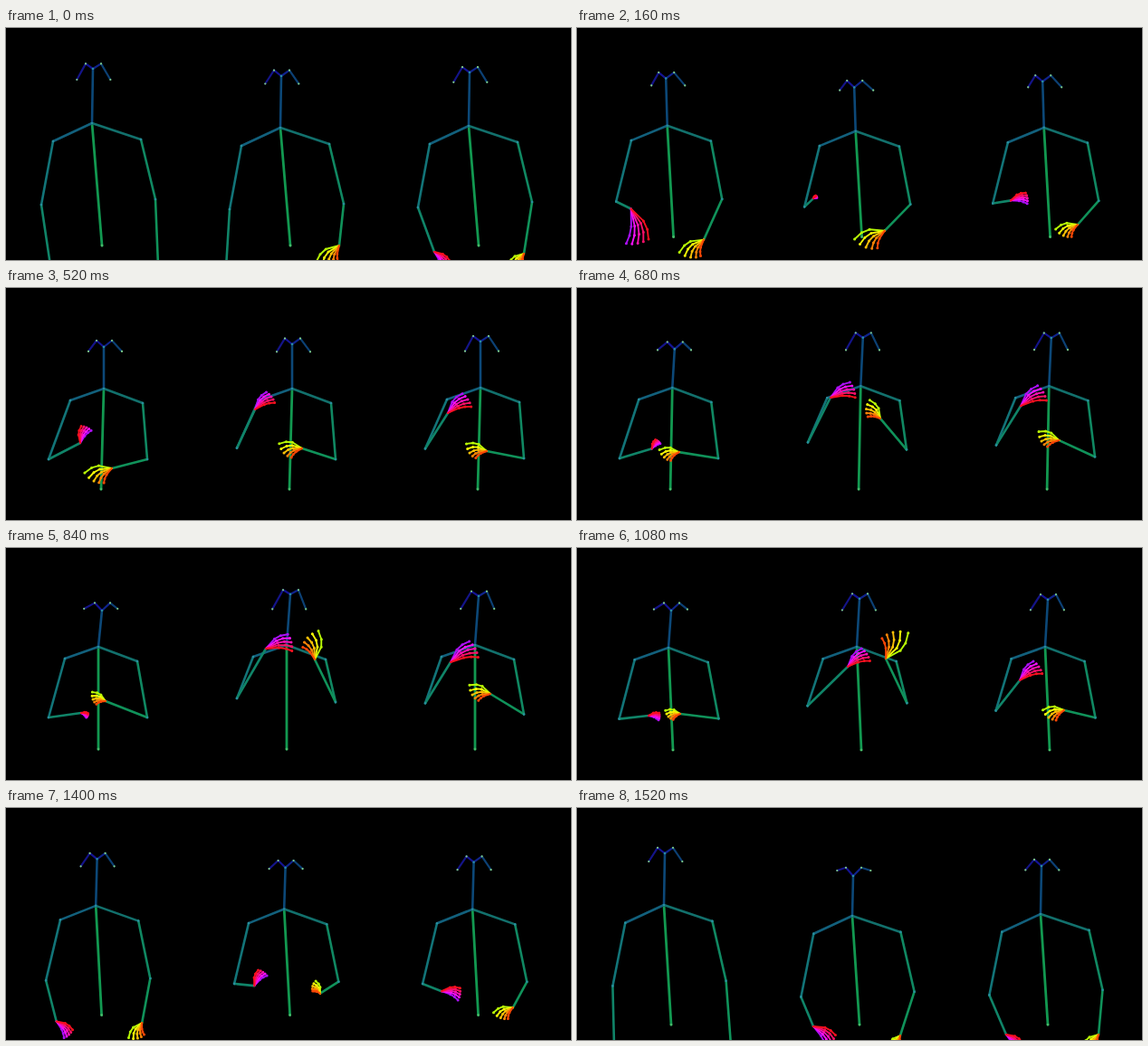
An HTML page that plays this animation: 624 by 256 pixels, repeating every 1560 ms.

```html
<!DOCTYPE html>
<html lang="en">
<head>
<meta charset="utf-8">
<title>Three skeletons</title>
<style>
html, body { margin: 0; width: 100%; height: 100%; overflow: hidden; background: #000; }
svg { display: block; width: 624px; height: 256px; }
path { fill: none; stroke-linecap: round; stroke-linejoin: round; }
</style>
</head>
<body>
<svg id="stage" viewBox="0 0 624 256"></svg>
<script>
const LOOP = 1560, STEP = 40;
const TIMES = [0, 320, 520, 840, 1080, 1240, 1520];
const stage = document.getElementById('stage');

// Movement all three figures share: arms hanging (1) or lifted (0), and sideways sway.
const REST = [1, .1, 0, 0, .05, -.15, .95];
const HIP = [0, 1, -1, -4, 0, 1, -2];
const NECK = [-11, -2, 2, -4, -5, -4, -10];
const LEAN = [1, -3, 0, 4, 3, 2, 1];

// Per figure: centre, neck and nose heights, and each hand as wrist x, y, fingertip x, y.
const FIGURES = [
  {
    x: 106,
    neck: [105, 110, 111, 109, 110, 109, 107],
    nose: [45, 63, 65, 69, 69, 64, 50],
    hands: [
      [49,262,52,292, 70,162,80,190, 82,171,89,154, 83,182,90,185, 79,185,91,186, 72,204,91,204, 41,262,45,292],
      [168,262,165,292, 121,211,100,224, 117,199,97,213, 110,169,96,167, 114,183,101,186, 127,206,119,210, 170,262,167,292]
    ]
  },
  {
    x: 314,
    neck: [110, 116, 111, 107, 109, 105, 119],
    nose: [53, 73, 62, 51, 56, 57, 75],
    hands: [
      [243,265,252,298, 273,139,277,119, 275,134,293,120, 287,111,315,104, 299,131,320,117, 290,148,289,114, 261,241,281,258],
      [368,240,356,262, 323,206,297,220, 327,177,307,182, 341,123,333,99, 341,122,349,93, 338,151,327,122, 357,251,352,265]
    ]
  },
  {
    x: 522,
    neck: [108, 111, 110, 107, 109, 107, 117],
    nose: [49, 65, 59, 53, 57, 56, 64],
    hands: [
      [473,247,486,262, 484,150,506,136, 488,138,510,123, 491,126,518,111, 489,146,510,131, 488,155,513,146, 474,250,488,264],
      [572,249,564,264, 538,192,518,200, 531,180,512,182, 535,161,515,162, 538,179,521,187, 543,189,525,197, 576,250,568,265]
    ]
  }
];

// Lifted offset plus extra when the arms hang.
const SIDES = [
  { shoulder: [-37, -6, 13, 7], elbow: [-59, -8], drop: 12, bend: -.35, shrink: 0, hue: i => `hsl(${280 + i * 19} 95% 52%)` },
  { shoulder: [43, 11, 16, 2], elbow: [50, 9], drop: 6, bend: .45, shrink: .25, hue: i => `hsl(${76 - i * 15} 95% 50%)` }
];

function line(color, width) {
  const el = document.createElementNS('http://www.w3.org/2000/svg', 'path');
  el.setAttribute('stroke', color);
  el.setAttribute('stroke-width', width);
  return stage.appendChild(el);
}

const makeView = () => ({
  spine: line('#129850', 2.8),
  arms: [['#12607c', '#127478', '#108468'], ['#12706c', '#108862', '#10925a']].map(a => a.map(c => line(c, 2.6))),
  throat: line('#0c4878', 2.6),
  face: ['#141488', '#141494', '#10248c', '#0c4074'].map(c => line(c, 2.2)),
  joints: line('#288c9c', 2.6),
  ears: line('#80cc80', 2.2),
  hip: line('#48b868', 2.8),
  hands: SIDES.map(s => Array.from({ length: 5 }, (_, i) => ({ bone: line(s.hue(i), 1.9), knots: line(s.hue(i), 3) })))
});
const views = FIGURES.map(makeView);

// Smooth interpolation that never overshoots a key.
function track(keys, t, size = 1, n = 0) {
  let i = 0;
  while (i < TIMES.length - 2 && t >= TIMES[i + 1]) i++;
  const val = k => keys[k * size + n];
  const slope = k => (val(k + 1) - val(k)) / (TIMES[k + 1] - TIMES[k]);
  const tangent = k => {
    if (k === 0) return slope(0);
    if (k === TIMES.length - 1) return slope(k - 1);
    const a = slope(k - 1), b = slope(k);
    return a * b > 0 ? 2 * a * b / (a + b) : 0;
  };
  const h = TIMES[i + 1] - TIMES[i], u = (t - TIMES[i]) / h, v = 1 - u;
  return val(i) * v * v * (1 + 2 * u) + val(i + 1) * u * u * (1 + 2 * v)
    + h * u * v * (tangent(i) * v - tangent(i + 1) * u);
}

const clamp = (v, lo, hi) => Math.max(lo, Math.min(hi, v));
const mix = (a, b, k) => [a[0] + (b[0] - a[0]) * k, a[1] + (b[1] - a[1]) * k];
const polar = (p, angle, r) => [p[0] + Math.cos(angle) * r, p[1] + Math.sin(angle) * r];
const at = p => p[0].toFixed(1) + ' ' + p[1].toFixed(1);
const join = (el, ...pts) => el.setAttribute('d', 'M' + pts.map(at).join('L'));
const dots = (el, ...pts) => el.setAttribute('d', pts.map(p => 'M' + at(p) + 'h.01').join(''));

function drawHand(fingers, side, wrist, tip) {
  const dx = tip[0] - wrist[0], dy = tip[1] - wrist[1];
  const angle = Math.atan2(dy, dx), reach = Math.hypot(dx, dy);
  // The left palm turns over as it rises.
  const spread = side.shrink ? -.45 : .33 * clamp((153 - wrist[1]) / 4, -1, 1);
  fingers.forEach((f, i) => {
    const k = i / 2 - 1, r = reach * (1 - k * side.shrink), a = angle + k * spread;
    const end = polar(wrist, a, r);
    const knuckle = polar(wrist, a + side.bend + k * spread * .3, r * .62);
    const knots = [.45, .72, 1].map(u => mix(mix(wrist, knuckle, u), mix(knuckle, end, u), u));
    join(f.bone, wrist, ...knots);
    dots(f.knots, ...knots);
  });
}

function drawFigure(fig, view, t) {
  const rest = track(REST, t), lean = track(LEAN, t);
  const hip = [fig.x + track(HIP, t), 222 + 18 * rest];
  const neck = [fig.x + track(NECK, t), track(fig.neck, t)];
  const nose = [neck[0] + lean, track(fig.nose, t)];
  const pitch = (neck[1] - nose[1]) * 1.15 - 48 - 9 * rest;
  const [earL, eyeL, eyeR, earR] = [[-17 - lean * .7, pitch], [-8, pitch * .2 - 8], [9, pitch * .2 - 8], [20 - lean * .7, pitch]]
    .map(([x, y]) => [nose[0] + x, nose[1] + y]);
  const joints = [neck, nose];

  join(view.spine, neck, hip);
  join(view.throat, neck, nose);
  [[earL, eyeL], [eyeL, nose], [nose, eyeR], [eyeR, earR]].forEach((pair, i) => join(view.face[i], ...pair));

  SIDES.forEach((side, i) => {
    const [wx, wy, tx, ty] = [0, 1, 2, 3].map(n => track(fig.hands[i], t, 4, n));
    const [sx, sxr, sy, syr] = side.shoulder;
    const shoulder = [neck[0] + sx + sxr * rest, neck[1] + sy + syr * rest];
    const lift = Math.min(75 + .35 * (wy - neck[1] - 50), 78 + side.drop * rest);
    const elbow = [fig.x + side.elbow[0] + side.elbow[1] * rest, neck[1] + lift];
    const arm = [neck, shoulder, elbow, [wx, wy]];
    view.arms[i].forEach((el, n) => join(el, arm[n], arm[n + 1]));
    joints.push(shoulder, elbow);
    drawHand(view.hands[i], side, [wx, wy], [tx, ty]);
  });

  dots(view.joints, ...joints);
  dots(view.ears, earL, eyeL, eyeR, earR);
  dots(view.hip, hip);
}

const start = performance.now();
function tick() {
  const t = Math.floor((performance.now() - start) % LOOP / STEP) * STEP;
  FIGURES.forEach((fig, i) => drawFigure(fig, views[i], t));
  requestAnimationFrame(tick);
}
tick();
</script>
</body>
</html>
```
